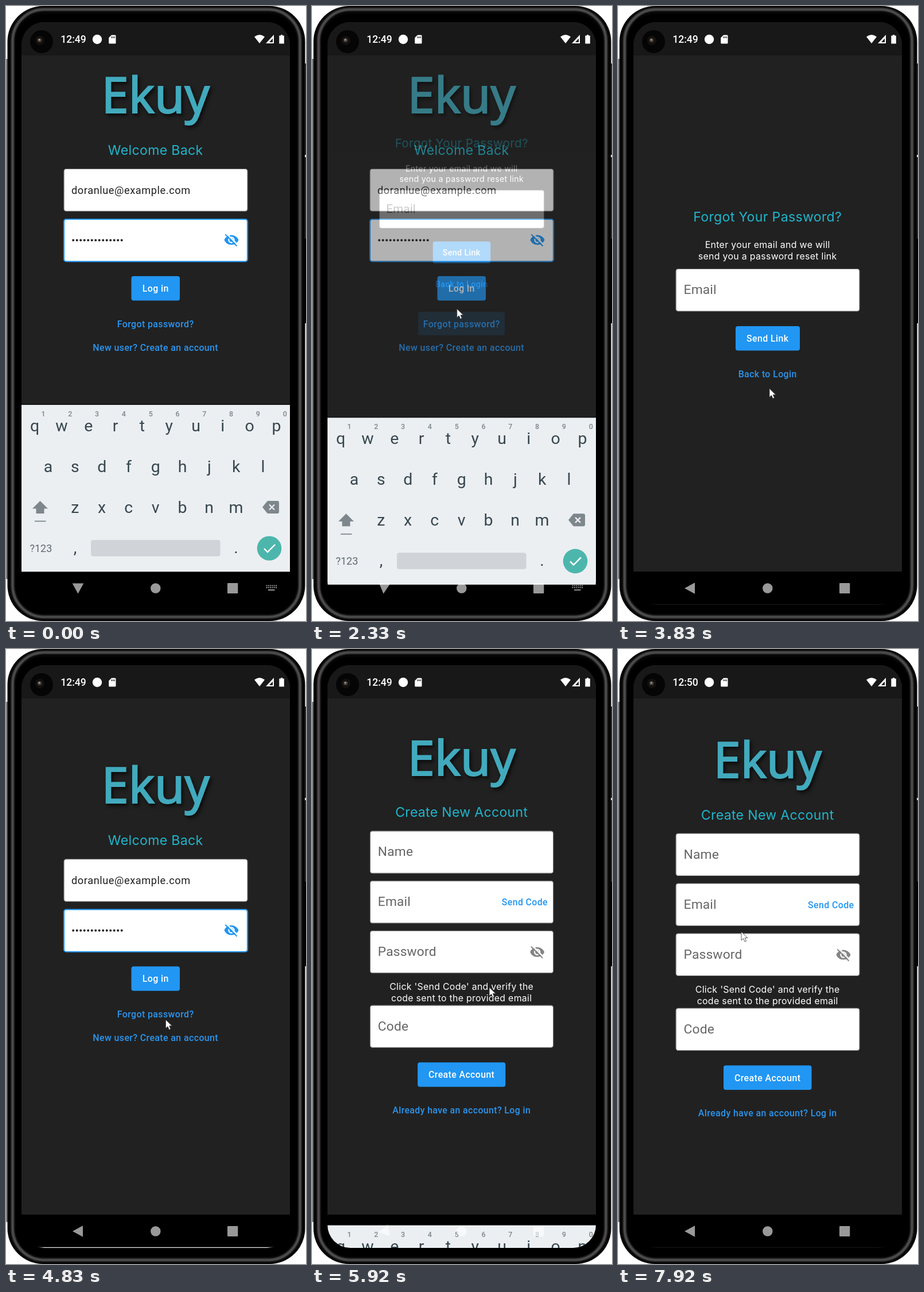
An HTML page that plays this animation: 523 by 1070 pixels, repeating every 8 s.

```html
<!DOCTYPE html>
<html lang="en">
<head>
<meta charset="utf-8">
<title>Login screens</title>
<style>
  html, body { margin: 0; width: 100%; height: 100%; overflow: hidden; background: #fff; }
  svg { display: block; width: 523px; height: 1070px; }
  text { white-space: pre; }
  .mid { text-anchor: middle; }
  .logo { font: 400 85px "Noto Sans", "Open Sans", sans-serif; fill: #42aabd; stroke: #42aabd; stroke-width: 2; filter: drop-shadow(3px 4px 3px #0b0b0b); }
  .title { font: 400 23.1px Inter, sans-serif; letter-spacing: .32px; fill: #1fb6cc; }
  .note { font: 400 15.94px Inter, sans-serif; letter-spacing: .285px; fill: #fff; }
  .hint { font: 400 22.8px Roboto, sans-serif; letter-spacing: .17px; fill: #666; }
  .value { font: 400 18.22px Roboto, sans-serif; letter-spacing: .57px; fill: #212121; }
  .btn { font: 500 15.94px Roboto, sans-serif; letter-spacing: .38px; fill: #fff; }
  .link { fill: #2b95ee; }
  .key { font: 400 28.5px Roboto, sans-serif; fill: #37474f; }
  .num { font: 500 12.5px Roboto, sans-serif; fill: #7b868b; }
  .sym { font: 400 18px Roboto, sans-serif; fill: #5f6b71; }
  .clock { font: 500 17.6px Roboto, sans-serif; fill: #fff; }
</style>
</head>
<body>
<svg id="stage" viewBox="0 0 523 1070" xmlns="http://www.w3.org/2000/svg"></svg>
<script>
const LOOP = 8000;
const BLUE = '#2196f3';
const MID = 260.7;

const rect = (x, y, w, h, fill, rx = 0, extra = '') =>
  `<rect x="${x}" y="${y}" width="${w}" height="${h}" rx="${rx}" fill="${fill}" ${extra}/>`;
const text = (cls, x, y, s, extra = '') =>
  `<text class="${cls}" x="${x}" y="${y}" ${extra}>${s}</text>`;
const centred = (cls, y, s) => text(cls + ' mid', MID, y, s);
const path = (d, fill, extra = '') => `<path d="${d}" fill="${fill}" ${extra}/>`;
const circle = (x, y, r, fill, extra = '') =>
  `<circle cx="${x}" cy="${y}" r="${r}" fill="${fill}" ${extra}/>`;
const group = (id, body, extra = '') => `<g id="${id}" ${extra}>${body}</g>`;

const logo = y => centred('logo', y, 'Ekuy');

function field(y, hint = '', focused = false) {
  const edge = focused ? `stroke="${BLUE}" stroke-width="2.2"` : 'stroke="#777" stroke-width="1.2"';
  return rect(101, y, 320, 73.5, '#fff', 4, edge) + (hint && text('hint', 114.5, y + 43.8, hint));
}

function button(x, y, w, label) {
  return rect(x, y, w, 42.5, BLUE, 4) + centred('btn', y + 27, label);
}

// Crossed-out eye on a 24 unit grid
function eye(y, colour) {
  return `<g transform="translate(379.3 ${y - 13.7}) scale(1.138)">` +
    path('M1 12C2.7 7.6 7 4.5 12 4.5S21.3 7.6 23 12C21.3 16.4 17 19.5 12 19.5S2.7 16.4 1 12ZM7 12a5 5 0 1 0 10 0a5 5 0 1 0-10 0Z', colour, 'fill-rule="evenodd"') +
    circle(12, 12, 3, colour) +
    path('M4 1.8L22 19.8', 'none', 'stroke="#fff" stroke-width="2"') +
    path('M2.6 3.6L20.4 21.4', 'none', `stroke="${colour}" stroke-width="1.8"`) + '</g>';
}

const page = (id, body, press = '') =>
  group(id, rect(27, 28, 468, 956, '#212121') + group(id + 'Body', body + press));

const pressed = (id, x, y, w) => rect(x, y, w, 41, BLUE, 4, `id="${id}" opacity="0"`);

function loginPage() {
  let dots = '';
  for (let i = 0; i < 14; i++) dots += circle(117.2 + i * 6.5, 407.6, 2, '#212121');
  return page('login', logo(186) + centred('title', 259, 'Welcome Back') +
    field(283.5) + text('value', 114, 327, 'doranlue@example.com') +
    field(371, '', true) + dots + rect(204.8, 397, 2.2, 22, BLUE, 0, 'id="caret"') + eye(407, BLUE) +
    button(218.5, 470, 84.5, 'Log in') +
    centred('btn link', 558.5, 'Forgot password?') +
    centred('btn link', 600, 'New user? Create an account'),
    pressed('pressForgot', 185, 532, 151) + pressed('pressNew', 143, 574, 235));
}

function forgotPage() {
  return page('forgot', centred('title', 374.5, 'Forgot Your Password?') +
    centred('note', 421, 'Enter your email and we will') +
    centred('note', 441, 'send you a password reset link') +
    field(457.5, 'Email') + button(205, 557, 112, 'Send Link') +
    centred('btn link', 645.5, 'Back to Login'), pressed('pressBack', 206, 619, 110));
}

function createPage() {
  return page('create', logo(223.5) + centred('title', 296.5, 'Create New Account') +
    field(321, 'Name') + field(408, 'Email') +
    text('btn', 331, 451, 'Send Code', `style="fill:${BLUE}"`) +
    field(495, 'Password') + eye(532, '#858585') +
    centred('note', 598, "Click 'Send Code' and verify the") +
    centred('note', 618, 'code sent to the provided email') +
    field(625, 'Code') + button(184, 724.5, 153.5, 'Create Account') +
    centred('btn link', 813, 'Already have an account? Log in'));
}

function keyboard() {
  const row = (keys, x, y) => [...keys].map((k, i) => text('key mid', x + i * 46.8, y, k)).join('');
  const digits = [...'1234567890'].map((d, i) => text('num mid', 65 + i * 46.8, 714, d)).join('');
  const grey = '#7d878c';
  return group('keys',
    rect(27, 692.5, 468, 1.5, '#111') + rect(27, 694, 468, 290.5, '#eceff2') +
    rect(27, 984.5, 468, 400, '#000') +
    digits + row('qwertyuiop', 50.2, 740) + row('asdfghjkl', 73.6, 811) + row('zxcvbnm', 120.2, 882) +
    path('M59.5 861L73 874.5H66.5V883H52.5V874.5H46Z', grey) + rect(50, 895.5, 19.5, 1.8, grey) +
    path('M447 872L455 862Q456 861 457 861H473Q476 861 476 864V880Q476 883 473 883H457Q456 883 455 882Z', grey) +
    path('M459 867.5l9 9m0-9l-9 9', 'none', 'stroke="#eceff2" stroke-width="2.2"') +
    text('sym', 41.5, 950, '?123') + text('key mid', 120.5, 952, ',') + text('key mid', 401, 952, '.') +
    rect(148, 929, 225.5, 28.5, '#d0d4d8', 4) + circle(459, 943.5, 21.3, '#4db6ac') +
    path('M450 944l6 6 13-13', 'none', 'stroke="#fff" stroke-width="2.4"'));
}

function navIcons() {
  let mini = '';
  for (let r = 0; r < 2; r++)
    for (let c = 0; c < 6; c++) mini += rect(453.5 + c * 3.3, 1007.5 + r * 3.4, 2, 2, '#fff');
  mini += rect(457, 1015, 11.5, 2, '#fff');
  return `<g opacity=".6">` +
    path('M-9.5 0L8.5-9.8V9.8Z', '#fff', 'id="back"') + circle(260.8, 1013, 8.7, '#fff') +
    rect(386, 1004, 18.3, 18, '#fff', 1) + group('mini', mini) + '</g>';
}

function statusBar() {
  return rect(27, 28, 468, 58, '#181818') +
    circle(62, 62, 20, '#050505') + circle(59, 60, 8, '#131110') +
    circle(58.5, 59.5, 3.6, '#4a423c') + circle(58, 58.8, 1.4, '#b0a69f') +
    text('clock', 95.2, 64, '12:49', 'id="clock"') + circle(159, 58, 8.2, '#fff') +
    path('M184 50.5H190.2Q191.5 50.5 191.5 52V64Q191.5 65.5 190.2 65.5H180.5Q179.2 65.5 179.2 64V55.3Z', '#fff') +
    path('M184.2 53v3m2.5-3v3m2.5-3v3', 'none', 'stroke="#181818" stroke-width="1.2"') +
    path('M433 53.5Q442 46.5 451 53.5L442 65Z', '#fff') +
    path('M467 50V65H453Z', '#fff') + path('M465 56.5V63H459Z', '#181818') +
    path('M479 50h3v1.5h2.8V65.5H476.3V51.5H479Z', '#fff');
}

function phone() {
  return rect(0, 0, 523, 1070, '#fff') + rect(0.8, 92, 1.4, 905, '#222') +
    rect(2.5, 0, 519, 1070, '#050505', 62) +
    rect(11.5, 6, 501, 1057, 'none', 55, 'stroke="#505050" stroke-width="5" filter="url(#soft)"') +
    rect(17, 14, 490, 1043, '#000', 49) +
    rect(521, 100, 2, 305, '#2a2a2a') + rect(521, 405, 2, 147, '#000') + rect(521, 259, 2, 4, '#ddd');
}

const stage = document.getElementById('stage');
stage.innerHTML =
  `<defs><clipPath id="glass"><rect x="27" y="28" width="468" height="1014" rx="40"/></clipPath>` +
  `<filter id="soft"><feGaussianBlur stdDeviation="1.3"/></filter></defs>` +
  phone() +
  `<g clip-path="url(#glass)">` + rect(27, 28, 468, 1014, '#000') +
  `<svg x="27" y="28" width="468" height="956.5" viewBox="27 28 468 956.5" style="width:468px;height:956.5px">` +
  loginPage() + forgotPage() + createPage() + '</svg>' +
  statusBar() + keyboard() + navIcons() + '</g>' +
  path('M0 0V15L3.5 11.8L6 17.4L8.6 16.2L6.2 10.8H11Z', '#fff', 'id="mouse" stroke="#333" stroke-width=".8"');

const el = {};
stage.querySelectorAll('[id]').forEach(n => el[n.id] = n);
const set = (id, name, v) => el[id].setAttribute(name, v);

const clamp = v => Math.max(0, Math.min(1, v));
const span = (t, from, len) => clamp((t - from) / len);
const smooth = p => p * p * (3 - 2 * p);
const easeOut = p => 1 - (1 - p) * (1 - p);

// Transition starts: forgot page opens, closes, keyboard returns, create page opens
const OPEN = 2280, CLOSE = 4580, KEYS_UP = 4820, CREATE = 5660;
const SLIDE = 330, TRAVEL = 348;

const track = [
  [940, 519, 150], [1400, 254, 186], [1520, 250, 190], [1680, 250, 200], [2060, 256, 548], [2260, 254, 546],
  [2560, 245, 412], [2800, 245, 411], [3760, 264, 664], [3860, 264, 666], [4290, 262, 637], [4620, 262, 637],
  [5060, 297, 654], [5120, 297, 655], [5420, 292, 590], [5700, 294, 589], [5900, 309, 589], [6250, 318, 560],
  [6800, 290, 620], [7350, 236, 560], [7900, 215, 492], [8000, 215, 491]
];

function mouseAt(t) {
  let i = 1;
  while (i < track.length - 1 && track[i][0] < t) i++;
  const [t0, x0, y0] = track[i - 1], [t1, x1, y1] = track[i];
  const p = smooth(span(t, t0, t1 - t0));
  return [x0 + (x1 - x0) * p, y0 + (y1 - y0) * p];
}

function zoom(id, t, start, dy) {
  const s = 0.85 + 0.15 * easeOut(span(t, start, 300));
  set(id + 'Body', 'transform', `translate(${MID} ${535 + dy}) scale(${s}) translate(${-MID} -535)`);
  return span(t, start, 150);
}

const press = (id, t, at) =>
  set(id, 'opacity', 0.16 * span(t, at, 90) * (1 - span(t, at + 250, 150)));

function draw(t) {
  const down = t < KEYS_UP ? smooth(span(t, OPEN, SLIDE))
    : t < CREATE ? 1 - smooth(span(t, KEYS_UP, SLIDE)) : smooth(span(t, CREATE, SLIDE));
  const lift = -Math.min(145, 372 * (1 - down) ** 2);

  set('keys', 'transform', `translate(0 ${down * TRAVEL})`);
  set('back', 'transform', `translate(125.5 1013) rotate(${-90 * (1 - down)})`);
  set('mini', 'opacity', 1 - down);

  const leaving = t >= CLOSE;
  const fade = zoom('forgot', t, OPEN, leaving ? 0 : lift);
  set('forgot', 'opacity', leaving ? 1 - span(t, CLOSE, 200) : fade);
  set('create', 'opacity', zoom('create', t, CREATE, lift));
  const settle = leaving ? 145 * (1 - smooth(span(t, KEYS_UP - 80, 200))) : 0;
  set('loginBody', 'transform', `translate(0 ${settle})`);

  const phase = leaving ? t - 3990 : t + 580;
  set('caret', 'opacity', phase % 1000 < 500 ? 1 : 0);

  press('pressForgot', t, 2130);
  press('pressBack', t, 4300);
  press('pressNew', t, 5490);

  const [x, y] = mouseAt(t);
  set('mouse', 'transform', `translate(${x} ${y})`);
  set('mouse', 'opacity', t < track[0][0] ? 0 : 1);

  const time = t < 7500 ? '12:49' : '12:50';
  if (el.clock.textContent !== time) el.clock.textContent = time;
}

const began = performance.now();
function tick() {
  draw((performance.now() - began) % LOOP);
  requestAnimationFrame(tick);
}
tick();
</script>
</body>
</html>
```
